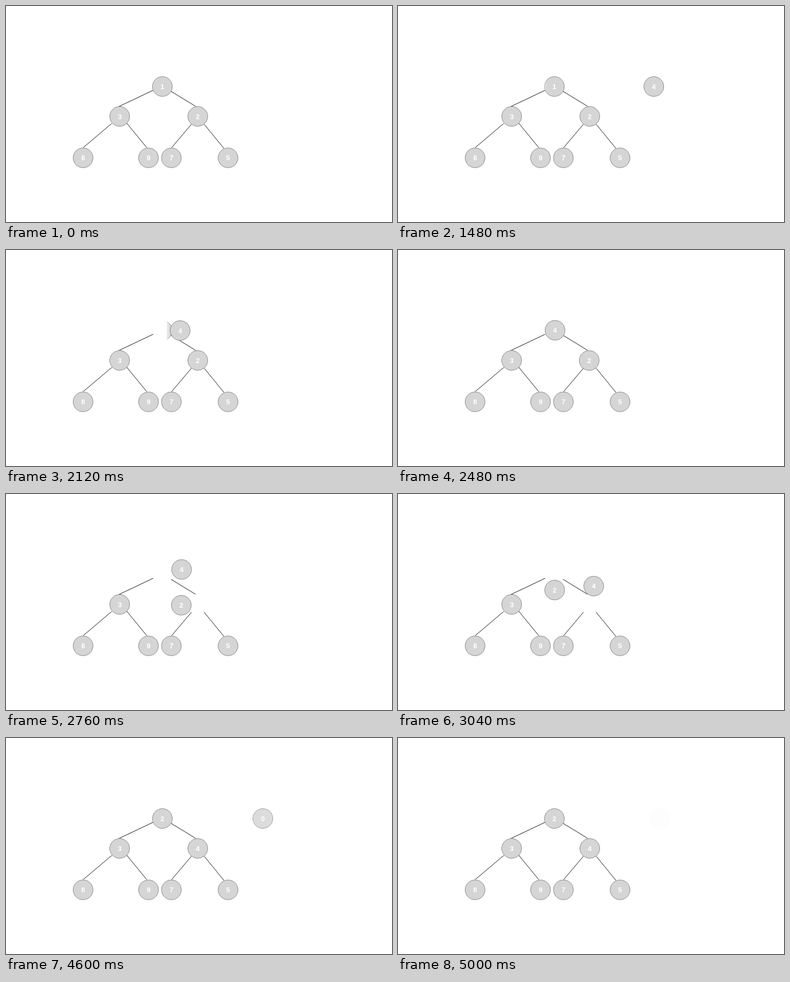
Recreate the animation shown at these times as an HTML page. Size 720 px wide and 405 px high, loop 5.8 s.

```html
<!DOCTYPE html>
<html lang="en">
<head>
<meta charset="utf-8">
<title>Heap insertion</title>
<style>
  html, body { margin: 0; width: 100%; height: 100%; overflow: hidden; background: #fff; }
  svg { display: block; width: 100vw; height: 100vh; }
  circle { fill: #d5d5d5; stroke: #7c7c7c; stroke-width: .9; }
  text { fill: #fff; font: bold 13px "Liberation Sans", Arial, sans-serif; text-anchor: middle; }
  .edges { fill: none; stroke: #111; stroke-width: 1; }
</style>
</head>
<body>
<svg id="stage" viewBox="0 0 720 405">
  <defs>
    <linearGradient id="soft" gradientUnits="userSpaceOnUse" x1="-20" x2="-13">
      <stop offset="0" stop-color="#fff" stop-opacity="0"/>
      <stop offset="0" stop-color="#fff" stop-opacity=".45"/>
      <stop offset="1" stop-color="#fff"/>
    </linearGradient>
    <mask id="wipe" maskUnits="userSpaceOnUse" x="0" y="0" width="720" height="405">
      <rect width="720" height="405" fill="url(#soft)"/>
    </mask>
  </defs>
  <path class="edges" d="M274.5 158 210.5 188.5M308 160 353.5 188M197.5 220 144 265.5M225 219.5 262.5 265.5M346 221.5 309 265.5M369.5 221.5 406.5 267"/>
  <g id="nodes"></g>
</svg>
<script>
const NS = "http://www.w3.org/2000/svg";
const LOOP = 5800, STEP = 40, LAST = 5000;
const ROOT = [291.7, 151], RIGHT = [357.7, 207], SIDE = [477.2, 151];
const DRIFT = 11;

const $ = id => document.getElementById(id);

function make(tag, attrs, parent) {
  const el = document.createElementNS(NS, tag);
  for (const key in attrs) el.setAttribute(key, attrs[key]);
  if (parent) parent.append(el);
  return el;
}

function place(node, x, y, alpha = 1) {
  node.setAttribute("transform", `translate(${x} ${y})`);
  node.setAttribute("opacity", alpha);
}

function addNode(label, [x, y], parent = $("nodes")) {
  const g = make("g", {}, parent);
  make("circle", { r: 18.5 }, g);
  make("text", { y: 4.6 }, g).textContent = label;
  place(g, x, y);
  return g;
}

const curve = (from, bend, to) => make("path", { d: `M${from}Q${bend} ${to}` });
const along = (path, k) => path.getPointAtLength(path.getTotalLength() * k);

const ramp = (t, start, span) => Math.min(1, Math.max(0, (t - start) / span));
const ease = p => (1 - Math.cos(Math.PI * p)) / 2;

addNode(3, [212, 207]);
addNode(8, [143.8, 284.7]);
addNode(9, [265.8, 284.7]);
addNode(7, [308.5, 284.7]);
addNode(5, [414.2, 284.7]);
const oldRoot = make("g", { mask: "url(#wipe)" }, $("nodes"));
addNode(1, ROOT, oldRoot);
const two = addNode(2, RIGHT);
const four = addNode(4, SIDE);
const zero = addNode(0, SIDE);

const down = curve(ROOT, [388.5, 115.3], RIGHT);
const up = curve(RIGHT, [282.3, 220], ROOT);

// Fade in while drifting left into the waiting spot
function enter(node, t, start) {
  const k = ease(ramp(t, start, 640));
  place(node, SIDE[0] + DRIFT * (1 - k), SIDE[1], k);
}

function wipeRoot(t) {
  const p = ramp(t, 1470, 900);
  const edge = p ? 270.5 + 41 * p : -20;
  $("soft").setAttribute("x1", edge);
  $("soft").setAttribute("x2", edge + 7);
  oldRoot.setAttribute("visibility", p < 1 ? "visible" : "hidden");
}

function draw(t) {
  wipeRoot(t);

  const swap = ease(ramp(t, 2420, 950));
  if (t < 800) place(four, ...SIDE, 0);
  else if (t < 1440) enter(four, t, 740);
  else if (t < 2400) {
    const k = ease(ramp(t, 1470, 900));
    place(four, SIDE[0] + (ROOT[0] - SIDE[0]) * k, ROOT[1]);
  } else {
    const spot = along(down, swap);
    place(four, spot.x, spot.y);
  }
  const spot = along(up, swap);
  place(two, spot.x, spot.y);

  if (t < 3680) place(zero, ...SIDE, 0);
  else if (t < 4400) enter(zero, t, 3620);
  else {
    const k = ease(ramp(Math.min(t, LAST), 4430, 630));
    place(zero, SIDE[0] + DRIFT * k, SIDE[1], 1 - k);
  }
}

const begin = performance.now();
function tick() {
  const t = (performance.now() - begin) % LOOP;
  draw(Math.floor(t / STEP) * STEP);
  requestAnimationFrame(tick);
}
tick();
</script>
</body>
</html>
```
